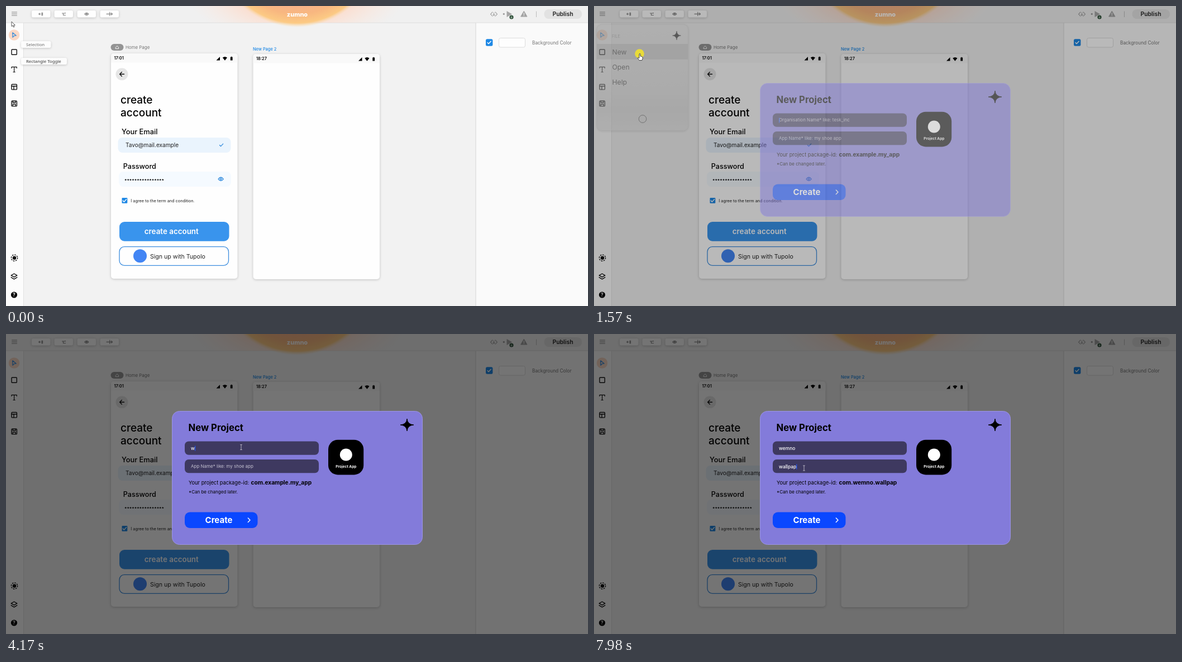
These frames come from a looping animation (1042 px wide and 538 px high, 8 s). An HTML page:

```html
<!DOCTYPE html>
<html lang="en">
<head>
<meta charset="utf-8">
<title>New project dialog</title>
<style>
  html, body { margin: 0; width: 100%; height: 100%; overflow: hidden; background: #f2f2f2; }
  svg { display: block; width: 100%; height: 100%; }
  text { font-family: Inter, "Open Sans", sans-serif; white-space: pre; }
  .line { fill: none; stroke: #111; stroke-width: 1.4; stroke-linecap: round; stroke-linejoin: round; }
  .grey { stroke: #858585; stroke-width: 1.2; }
  .blue { stroke: #2a87dc; stroke-width: 1.2; }
  .white { stroke: #fff; }
  .soft { filter: drop-shadow(0 1px 2px #0003); }
  .tip { font: 7.8px "Noto Sans", sans-serif; fill: #333; }
  .item { font-size: 12.2px; fill: #333; }
  .hint { font-size: 8px; fill: #c5c2d2; }
  .typed { font-size: 8.4px; font-weight: 500; fill: #fff; }
</style>
</head>
<body>
<svg viewBox="0 0 1042 538">
  <defs>
    <radialGradient id="sun">
      <stop offset=".7" stop-color="#f5b08c"/>
      <stop offset=".84" stop-color="#f8b780"/>
      <stop offset=".95" stop-color="#fcca84"/>
      <stop offset="1" stop-color="#fbdcae" stop-opacity="0"/>
    </radialGradient>
    <radialGradient id="glow">
      <stop offset=".5" stop-color="#ffd5c0" stop-opacity=".8"/>
      <stop offset="1" stop-color="#ffe6da" stop-opacity="0"/>
    </radialGradient>
    <linearGradient id="menuFill" x2="0" y2="1">
      <stop offset="0" stop-color="#f1f1f1"/>
      <stop offset=".6" stop-color="#e7e7e7"/>
      <stop offset=".8" stop-color="#dcdcdc"/>
      <stop offset="1" stop-color="#e6e6e6"/>
    </linearGradient>
    <path id="star" d="M0-11Q.8-.8 12 0Q.8.8 0 11Q-.8.8-12 0Q-.8-.8 0-11Z" stroke="#000" stroke-width=".9"/>
    <path id="check" d="M-3 0L-1 2.2L3.2-2.4"/>
    <g id="status">
      <path d="M376.5 97.5H383V91Z"/>
      <path d="M387.8 92.5Q391.9 89.3 396 92.5L391.9 97.8Z"/>
      <path d="M401.8 91.5H403V90.7H404.4V91.5H405.6V97.6H401.8Z"/>
    </g>
  </defs>

  <rect width="1042" height="538" fill="#f2f2f2"/>
  <rect y="30" width="31.5" height="508" fill="#fcfcfc"/>
  <path d="M31.5 30V538" stroke="#e2e2e2"/>
  <rect x="841" y="30" width="201" height="508" fill="#fafafa"/>
  <path d="M841 30V538" stroke="#d6d6d6"/>
  <rect width="1042" height="30" fill="#f0f0f0"/>
  <path d="M0 30H1042" stroke="#dedede"/>
  <svg width="1042" height="30"><ellipse cx="521" cy="-30" rx="200" ry="100" fill="url(#glow)"/></svg>
  <circle cx="521" cy="-110" r="148" fill="url(#sun)"/>
  <text x="521.5" y="18.5" font-size="11" font-weight="800" fill="#fff" text-anchor="middle">zumno</text>

  <!-- top bar -->
  <path class="line grey" d="M10.5 11H19.5M10.5 14H19.5M10.5 17H19.5" style="stroke-width:1"/>
  <g class="soft" fill="#fefefe">
    <rect x="46" y="8" width="33.5" height="12.5" rx="3"/>
    <rect x="86.5" y="8" width="33.5" height="12.5" rx="3"/>
    <rect x="127.5" y="8" width="33.5" height="12.5" rx="3"/>
    <rect x="168.5" y="8" width="33.5" height="12.5" rx="3"/>
  </g>
  <g class="line grey">
    <path d="M58.5 14.3H61.5M60 12.8V15.8M64 12V16.8M65.5 12V16.8"/>
    <path d="M100.5 13H106M102.5 13V16.5H106M105.5 12.5H106.5M105.5 16.5H106.5"/>
    <path d="M140.8 14.3Q144.3 10.3 147.8 14.3Q144.3 18.3 140.8 14.3Z"/>
    <circle cx="144.3" cy="14.3" r=".8"/>
    <path d="M180 14.3H190.5M185.8 11.2V17.4M188.6 12.4L190.5 14.3L188.6 16.2"/>
  </g>
  <g class="line grey" style="stroke:#a3a3a3">
    <path d="M871 11L867.5 14.6L871 18.2M876 11L879.5 14.6L876 18.2M873.5 12V17M872 15.6L873.5 17.2L875 15.6"/>
  </g>
  <circle cx="891.3" cy="14.3" r="1.6" fill="#999"/>
  <path d="M896.5 9V20L906 14.5Z" fill="#a6a6a6"/>
  <circle cx="905" cy="20" r="3.6" fill="#30523a"/>
  <path d="M905 18.5V21.5M903.8 20.4L905 21.6L906.2 20.4" class="line white" style="stroke-width:.6"/>
  <path d="M927.3 9.2L933 19H921.6Z" fill="#a3a3a3" stroke="#a3a3a3" stroke-linejoin="round"/>
  <path d="M927.3 12.5V15.8M927.3 17.2V17.6" class="line white" style="stroke-width:1"/>
  <path d="M949.5 9.5V20" stroke="#bbb"/>
  <rect x="963.5" y="6" width="67.5" height="17" rx="8" fill="#e2e2e2"/>
  <text x="997" y="18.3" font-size="10.4" font-weight="600" fill="#222" text-anchor="middle">Publish</text>

  <!-- property panel -->
  <rect x="859" y="59.3" width="12.4" height="12.4" rx="2.5" fill="#1e88e5"/>
  <use href="#check" x="865" y="65.6" class="line white"/>
  <rect x="882.5" y="57.5" width="47" height="16.5" rx="3" fill="#fefefe" stroke="#dcdcdc"/>
  <text x="942" y="68.5" font-size="8.3" fill="#757575">Background Color</text>

  <!-- tool strip -->
  <circle cx="14.5" cy="52" r="9.8" fill="#fad8c6"/>
  <path class="line blue" d="M11.8 47.8L18.2 53L14.7 53.4L12 56.2Z"/>
  <g class="line">
    <rect x="10" y="78" width="9.3" height="9.3" rx="1"/>
    <path d="M10 111.5V109.3H19.2V111.5M14.6 109.3V118.5M13 118.5H16.2" style="stroke-width:1.2"/>
    <rect x="10" y="140.5" width="9.4" height="9.4" rx="1.2"/>
    <path d="M10 143.8H19.4M14 143.8V149.8"/>
    <rect x="10" y="170.2" width="9.4" height="9.4" rx="1.2"/>
    <path d="M12.3 170.5V173.2H17V170.5M12.3 179.4V176H17V179.4"/>
    <circle cx="15" cy="451.7" r="2.6" fill="#111"/>
    <circle cx="15" cy="451.7" r="5.6" stroke-dasharray="1.6 2.8"/>
    <path d="M14.5 480L19.8 483.1L14.5 486.2L9.2 483.1Z"/>
    <path d="M9.2 486.6L14.5 489.9L19.8 486.6"/>
  </g>
  <circle cx="14.5" cy="518" r="5.6"/>
  <text x="14.5" y="521.2" font-size="8.5" font-weight="700" fill="#fff" text-anchor="middle">?</text>

  <!-- first phone page -->
  <rect x="187.5" y="68" width="23" height="12" rx="6" fill="#949494"/>
  <path d="M196.5 74L199 71.6L201.5 74V76.6H196.5Z" class="line white" style="stroke-width:.9"/>
  <text x="214" y="77" font-size="7.9" fill="#777">Home Page</text>
  <rect class="soft" x="188" y="85" width="226.5" height="404" rx="5" fill="#fefefe"/>
  <path d="M188 101.5V90Q188 85 193 85H409.500Q414.500 85 414.500 90V101.500Z" fill="#f9f9f9"/>
  <text x="193.500" y="95.800" font-size="7.3" font-weight="600">17:01</text>
  <use href="#status"/>
  <circle cx="207.500" cy="122.300" r="11" fill="#e6e6e6"/>
  <path class="line" d="M211.500 122.300H203.800M207.300 118.600L203.600 122.300L207.300 126"/>
  <g font-size="19" font-weight="500">
    <text x="205" y="175">create</text>
    <text x="205" y="198">account</text>
  </g>
  <text x="207" y="230" font-size="12.800" font-weight="500">Your Email</text>
  <rect x="200.500" y="236" width="202" height="27" rx="8" fill="#eaf4fd"/>
  <text x="214" y="253.200" font-size="10.100" fill="#222">Tavo@mail.example</text>
  <use href="#check" x="385.500" y="249.500" class="line blue"/>
  <text x="209.800" y="292" font-size="12.600" font-weight="500">Password</text>
  <rect x="202" y="297" width="201" height="27" rx="8" fill="#f5faff"/>
  <text x="212" y="315" font-size="7.400" font-weight="700" style="font-family:'Noto Sans Mono',monospace">****************</text>
  <g class="line blue">
    <path d="M380 310.300Q384.600 304 389.300 310.300Q384.600 316.600 380 310.300Z"/>
    <circle cx="384.600" cy="310.300" r="1.500"/>
  </g>
  <rect x="207.500" y="344" width="9.800" height="9.800" rx="1" fill="#1e88e5"/>
  <use href="#check" x="212.300" y="349" class="line white"/>
  <text x="223.300" y="352" font-size="7.300" fill="#222">I agree to the term and condition.</text>
  <rect x="203" y="387" width="196.500" height="34.700" rx="9" fill="#3994ed"/>
  <text x="296.300" y="408.500" font-size="13.400" font-weight="600" fill="#fff" text-anchor="middle">create account</text>
  <rect x="203" y="431.600" width="195.500" height="33.800" rx="9" fill="#fefefe" stroke="#3c8dde" stroke-width="1.300"/>
  <circle cx="240" cy="448.300" r="12" fill="#4285f4"/>
  <text x="258" y="453" font-size="10.600" fill="#222">Sign up with Tupolo</text>

  <!-- second phone page -->
  <text x="442" y="80.300" font-size="7.400" font-weight="500" fill="#1e88e5">New Page 2</text>
  <rect class="soft" x="442.500" y="86" width="226.500" height="404" rx="5" fill="#fefefe"/>
  <path d="M442.500 102.500V91Q442.500 86 447.500 86H664Q669 86 669 91V102.500Z" fill="#f9f9f9"/>
  <text x="448" y="97" font-size="7.300" font-weight="600">18:27</text>
  <use href="#status" x="254.500" y="1"/>

  <g id="tips">
    <g class="soft" fill="#fdfdfd">
      <rect x="27" y="63" width="53.500" height="12" rx="3"/>
      <rect x="27" y="93" width="82" height="12" rx="3"/>
    </g>
    <text class="tip" x="36" y="72" style="fill:#666">Selection</text>
    <text class="tip" x="36" y="102">Rectangle Toggle</text>
  </g>

  <g id="menu">
    <rect class="soft" x="5" y="33" width="163.500" height="190.500" rx="9" fill="url(#menuFill)" stroke="#d2d2d2" stroke-width=".6"/>
    <rect id="hover" x="5" y="68" width="163.500" height="27.800" fill="#cfcfcf"/>
    <text x="32" y="56.800" font-size="7.400" fill="#a5a5a5">FILE</text>
    <use href="#star" transform="translate(148 53) scale(.62 .72)"/>
    <text class="item" x="32.500" y="86.500">New</text>
    <text class="item" x="32.500" y="113.500">Open</text>
    <text class="item" x="32.500" y="140.800">Help</text>
    <circle cx="87" cy="202.500" r="6.800" fill="none" stroke="#444"/>
  </g>

  <rect id="dim" width="1042" height="538"/>

  <g id="dialog">
    <rect x="297.500" y="138.500" width="448" height="239" rx="13" fill="#837bda" stroke="#9c95e4"/>
    <text x="326.500" y="174" font-size="16.700" font-weight="700">New Project</text>
    <use href="#star" x="718" y="163"/>
    <g fill="#3e3960">
      <rect x="320" y="192.500" width="240" height="24.300" rx="7"/>
      <rect x="320" y="225" width="240" height="24.300" rx="7"/>
    </g>
    <text id="orgHint" class="hint" x="331" y="207.200">Organisation Name* like: tesk_inc</text>
    <text id="appHint" class="hint" x="331" y="240.200">App Name* like: my shoe app</text>
    <text id="org" class="typed" x="331" y="207.800"></text>
    <text id="app" class="typed" x="331" y="240.800"></text>
    <rect id="caret" width="1.300" height="9" fill="#2458f0"/>
    <rect x="577" y="189.700" width="63.200" height="62.700" rx="17"/>
    <circle cx="608.800" cy="216.500" r="11" fill="#fff"/>
    <text x="608.800" y="240" font-size="6.500" font-weight="700" fill="#fff" text-anchor="middle">Project App</text>
    <text x="327" y="269.800" font-size="9.250">Your project package-id:</text>
    <text id="pack" x="438.500" y="269.800" font-size="10.200" font-weight="700"></text>
    <text x="327" y="286" font-size="8">*Can be changed later.</text>
    <rect x="320" y="319.500" width="130.500" height="28.500" rx="9" fill="#0a47ff"/>
    <text x="381" y="338.800" font-size="15" font-weight="700" fill="#fff" text-anchor="middle">Create</text>
    <path class="line white" d="M433.300 330L437 333.700L433.300 337.400"/>
  </g>

  <circle id="click" cx="81.500" cy="85.500" r="8.300" fill="#f1e12d" opacity=".9"/>
  <g id="cursor">
    <path id="arrow" d="M0 0V8.600L2 6.900L3.500 10L5 9.300L3.600 6.300H6.300Z" fill="#fff" stroke="#333" stroke-width=".8"/>
    <path id="hand" d="M-1 0Q.200-1.300 1 0V4Q4.800 4.200 5 6V8.500L3.800 11.500H-1L-4 7.300Q-3.400 5.800-1 7.500Z" fill="#fff" stroke="#222" stroke-width=".8"/>
    <path id="beam" d="M-1.800-4.500H1.800M0-4.500V4.500M-1.800 4.500H1.800" stroke="#c2bfcc" stroke-width=".9"/>
  </g>
</svg>
<script>
const LOOP = 8000;
const $ = id => document.getElementById(id);
const clamp = v => Math.max(0, Math.min(1, v));
const ramp = (t, a, b) => clamp((t - a) / (b - a));
const within = (t, a, b) => t >= a && t < b;
const show = (id, on) => $(id).setAttribute('opacity', +on);

// pointer stops: time, x, y
const path = [
  [0, 10, 28], [280, 14, 11], [420, 14, 11], [830, 72, 56], [1040, 82, 86],
  [1640, 82, 86], [2280, 576, 240], [2900, 421, 204], [3170, 421, 204],
  [3240, 421, 203], [5640, 421, 203], [6180, 376, 240.5], [LOOP, 376, 240.5]
];
const orgTimes = [4120, 4720, 4800, 4890, 4980];
const appTimes = [6780, 6950, 7130, 7310, 7840, 7910, 7980];
const caretTimes = [[1500, 2650], [3170, 3640], [4040, 4980], [5180, 5640], [6100, LOOP]];

function pointer(t) {
  const i = path.findIndex(p => p[0] > t);
  const [a, b] = [path[i - 1], path[i]];
  const k = ramp(t, a[0], b[0]), e = k * k * (3 - 2 * k);
  return [a[1] + (b[1] - a[1]) * e, a[2] + (b[2] - a[2]) * e];
}

const typed = (word, times, t) => word.slice(0, times.filter(s => s <= t).length);

function draw(t) {
  const fade = ramp(t, 1500, 1640);
  show('tips', 1 - ramp(t, 0, 140));
  $('menu').setAttribute('opacity', ramp(t, 340, 480) * (1 - fade));
  show('hover', t >= 900);
  $('dim').setAttribute('opacity', .54 * fade);
  $('dialog').setAttribute('opacity', fade);
  $('click').setAttribute('opacity', within(t, 1490, 1635) ? .9 : 0);

  const org = typed('wemno', orgTimes, t), app = typed('wallpap', appTimes, t);
  $('org').textContent = org;
  $('app').textContent = app;
  show('orgHint', !org);
  show('appHint', !app);
  $('pack').textContent = app ? `com.${org}.${app}` : 'com.example.my_app';

  const second = t >= 6100;
  const field = $(second ? 'app' : 'org');
  $('caret').setAttribute('x', 331 + field.getComputedTextLength());
  $('caret').setAttribute('y', second ? 233.5 : 200.5);
  show('caret', caretTimes.some(([a, b]) => within(t, a, b)));

  const [x, y] = pointer(t);
  $('cursor').setAttribute('transform', `translate(${x} ${y})`);
  const hand = within(t, 620, 1710), beam = t >= 2420;
  show('hand', hand);
  show('beam', beam);
  show('arrow', !hand && !beam);
}

function tick() {
  draw(performance.now() % LOOP);
  requestAnimationFrame(tick);
}
tick();
</script>
</body>
</html>
```
